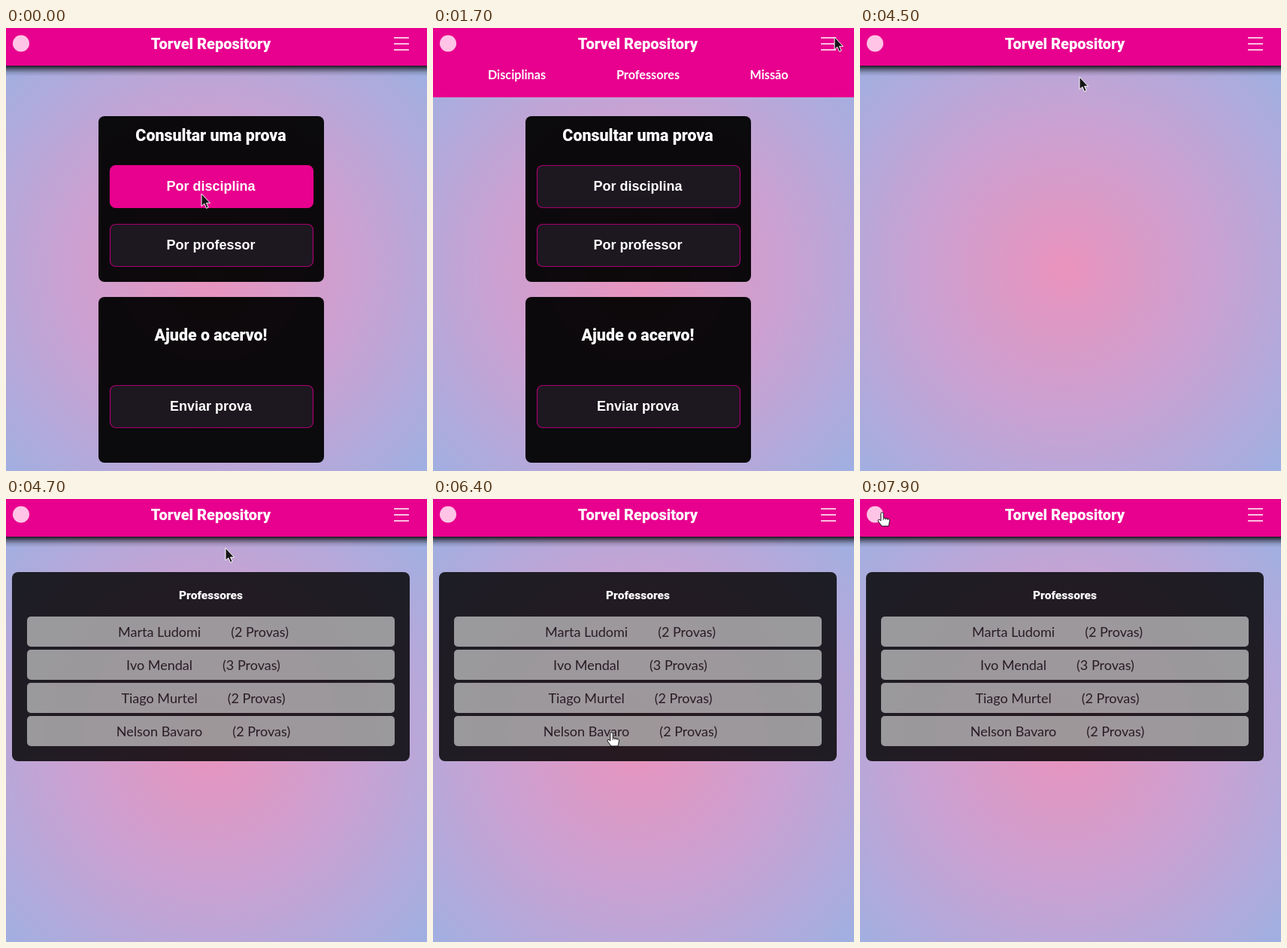
Write an HTML page that moves like this. It is 560 px wide and 588 px high and loops after 8 s.

```html
<!DOCTYPE html>
<html lang="pt">
<head>
<meta charset="utf-8">
<style>
  html, body { margin: 0; height: 100%; overflow: hidden; }
  svg { display: block; width: 560px; height: 588px;
    background: radial-gradient(circle 425px at 273px 320px, #ea93bd, #c8a2d3 48%, #98b2e4); }
  text { text-anchor: middle; fill: #fff; }
  .title { font: 900 21.4px Roboto, sans-serif; }
  .button text { font: bold 18px "Liberation Sans", Arial, sans-serif; }
  .button rect { fill: #1d1720; stroke: #a8006f; stroke-width: 1.2; }
  #menu text { font: 700 16.2px Lato, sans-serif; }
  .row text { font: 18px Lato, sans-serif; fill: #2a1c26; }
  .row rect { fill: #fff; fill-opacity: .55; }
</style>
</head>
<body>
<svg viewBox="0 0 560 588">
  <defs>
    <linearGradient id="fade" x2="0" y2="1">
      <stop stop-opacity=".85"/>
      <stop offset=".3" stop-opacity=".48"/>
      <stop offset=".65" stop-opacity=".15"/>
      <stop offset="1" stop-opacity="0"/>
    </linearGradient>
  </defs>
  <g id="home">
    <rect x="123" y="117" width="300" height="220" rx="8" fill-opacity=".94"/>
    <rect x="123" y="357" width="300" height="220" rx="8" fill-opacity=".94"/>
    <text class="title" x="272.5" y="150">Consultar uma prova</text>
    <text class="title" x="272.5" y="415">Ajude o acervo!</text>
  </g>
  <g id="list">
    <rect x="8" y="97" width="529" height="251" rx="8" fill-opacity=".83"/>
    <text class="title" x="272.5" y="133" style="font-size:15.5px">Professores</text>
  </g>
  <rect id="shadow" y="50" width="560" height="14" fill="url(#fade)"/>
  <rect id="header" width="560" height="50" fill="#e8008e"/>
  <circle cx="20" cy="20.5" r="11" fill="#ffc4e6"/>
  <text class="title" x="272.5" y="28" style="font-size:20px">Torvel Repository</text>
  <path d="M516 13h20m-20 8h20m-20 8h20" stroke="#fff" stroke-width="1.7"/>
  <g id="menu">
    <text x="111.5" y="68">Disciplinas</text>
    <text id="teachers" x="286" y="68">Professores</text>
    <text x="447" y="68">Missão</text>
  </g>
  <g id="cursor">
    <path id="arrow" d="M0 0V16.5l3.8-3.4 2.7 6.2 2.7-1.2-2.7-5.8H11.5z" fill="#151515" stroke="#fff"/>
    <g id="hand" stroke="#111">
      <path fill="#fff" d="M-2.2 10V1.5a1.7 1.7 0 0 1 3.4 0V7l6.5 1.3q2 .6 1.8 2.7l-.9 4.5-.8 2.5H-1.2q-1-2-4.3-6-1.4-2 .5-2.6 1.5-.2 2.8 1.6z"/>
      <path d="M1.2 7v3m2.8-2.5v2.5m2.7-2v2" stroke-width=".8"/>
    </g>
  </g>
</svg>
<script>
const $ = id => document.getElementById(id);
const show = (id, on) => $(id).style.display = on ? '' : 'none';
const add = (id, html) => $(id).insertAdjacentHTML('beforeend', html);
const clamp = v => Math.min(1, Math.max(0, v));

function addButton(y, label) {
  add('home', `<g class="button"><rect x="138.5" y="${y + .5}" width="270" height="56" rx="7.5"/>
    <text x="272.5" y="${y + 34}">${label}</text></g>`);
}
addButton(182, 'Por disciplina');
addButton(260, 'Por professor');
addButton(474, 'Enviar prova');
const hovered = document.querySelector('.button rect');

['Marta Ludomi', 'Ivo Mendal', 'Tiago Murtel', 'Nelson Bavaro'].forEach((name, i) =>
  add('list', `<g class="row"><rect x="28" y="${156 + 44 * i}" width="489" height="40" rx="5"/>
    <text x="262.5" y="${183 + 44 * i}">${name}<tspan dx="40">(${i == 1 ? 3 : 2} Provas)</tspan></text></g>`));

// Pointer moves: each eases to its goal along an arc bowed by "bow"
const moves = [
  { from: 500, to: 1400, goal: [547, 14], bow: [0, 22] },
  { from: 1500, to: 1600, goal: [534, 12] },
  { from: 3300, to: 3700, goal: [292, 65], bow: [0, 175] },
  { from: 4900, to: 5400, goal: [223, 236] },
  { from: 5800, to: 6400, goal: [238, 310], bow: [82, -88] },
  { from: 6400, to: 6600, goal: [312, 328] },
  { from: 6700, to: 7700, goal: [31, 42] },
  { from: 7800, to: 7900, goal: [30, 18] }
];

function pointer(t) {
  let pos = [260, 220];
  for (const { from, to, goal, bow = [0, 0] } of moves) {
    const k = Math.sin(clamp((t - from) / (to - from)) * Math.PI / 2);
    pos = pos.map((p, i) => p + (goal[i] - p) * k + bow[i] * 4 * k * (1 - k));
  }
  return pos;
}

function draw(now) {
  const t = Math.floor(now % 8000 / 100) * 100; // the screen updates ten times a second
  const [x, y] = pointer(t);
  const menu = t >= 1700 && t < 4500;
  const onTeachers = t >= 3700 && t < 4500;
  const onRow = t >= 4700 && y >= 156 && y < 328 && (y - 156) % 44 < 40;
  const hand = onTeachers || onRow || t >= 7900;

  show('home', t < 4500);
  show('list', t >= 4700);
  show('menu', menu);
  show('shadow', !menu);
  $('header').setAttribute('height', menu ? 92 : 50);
  $('teachers').style.fill = onTeachers ? '#2a0a20' : '#fff';

  const glow = (1 - clamp((t - 650) / 500)) ** 2.6;
  const mix = (a, b) => Math.round(a + (b - a) * glow);
  hovered.style.fill = `rgb(${mix(29, 232)},${mix(23, 0)},${mix(32, 142)})`;
  hovered.style.stroke = `rgb(${mix(168, 232)},0,${mix(111, 142)})`;

  $('cursor').setAttribute('transform', `translate(${x} ${y})`);
  show('arrow', !hand);
  show('hand', hand);
  requestAnimationFrame(() => draw(performance.now()));
}
draw(0);
</script>
</body>
</html>
```
